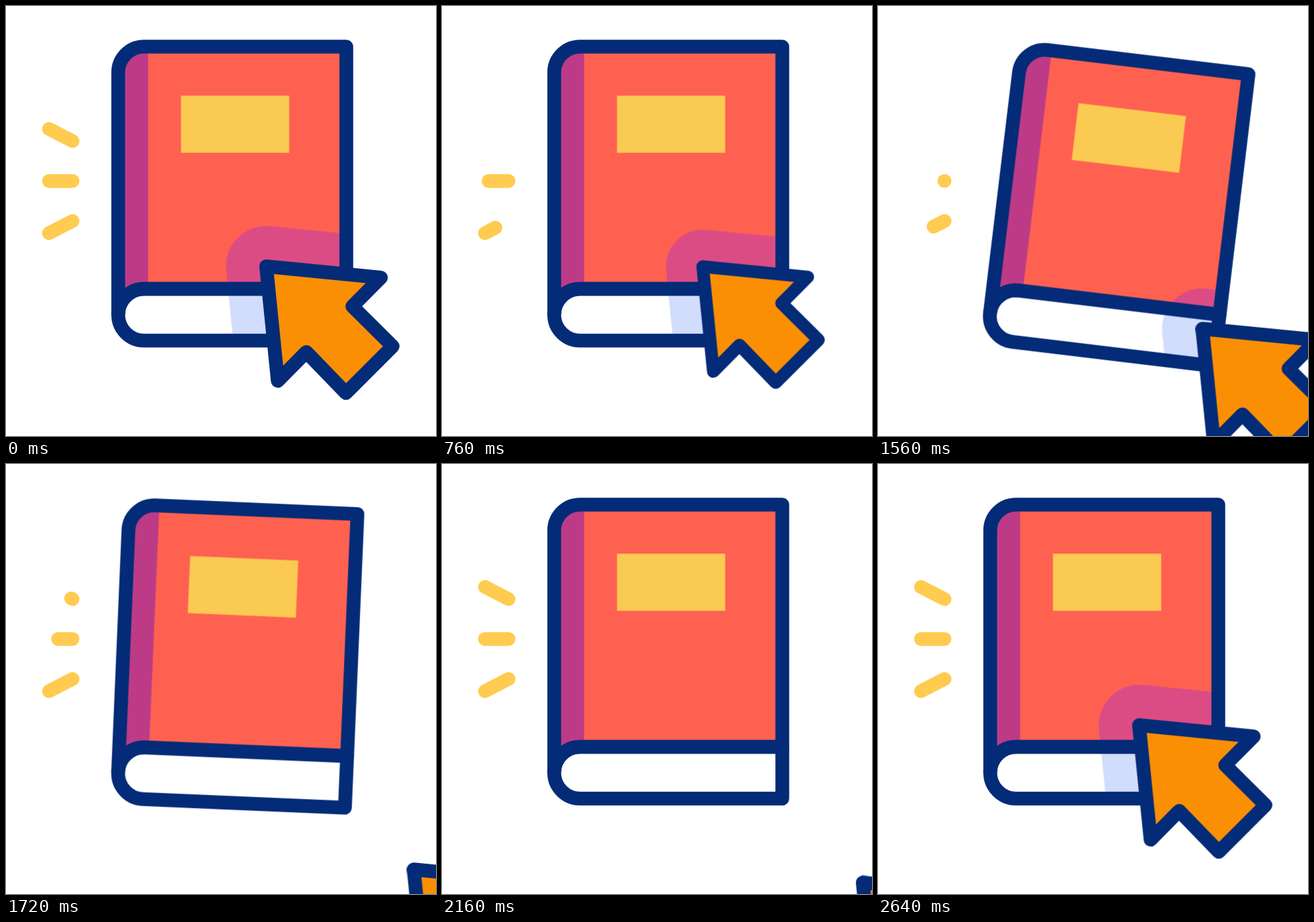
An HTML page that plays this animation: 640x640 px, repeating every 2680 ms.

```html
<!DOCTYPE html>
<html lang="en">
<head>
<meta charset="utf-8">
<title>Book and pointer</title>
<style>
  html, body { margin: 0; width: 100%; height: 100%; overflow: hidden; background: #fff; }
  svg { display: block; width: 100vw; height: 100vh; }

  .tilt, .untilt, .move, .press, .ray {
    animation: 2680ms cubic-bezier(.333, 0, .667, 1) infinite;
  }
  .tilt, .untilt { --dir: 1; transform-origin: 187px 456px; animation-name: tilt; }
  .untilt { --dir: -1; }
  .move { animation-name: move; }
  .press { transform-origin: 396px 392px; animation-name: press; }
  .ray { stroke-dasharray: 1 9; animation-name: ray; }
  .ray:nth-child(2) { animation-delay: -2550ms; }
  .ray:nth-child(3) { animation-delay: -2420ms; }

  .line { fill: none; stroke: #042b77; stroke-width: 20.5; stroke-linejoin: round; }
  .pointer { fill: #fb8f04; stroke: #042b77; stroke-width: 20.5; stroke-linejoin: round; }
  .shade { stroke-width: 120; stroke-linejoin: round; }
  .rays { fill: none; stroke: #ffcb50; stroke-width: 20.5; stroke-linecap: round; }

  @keyframes tilt {
    0%, 41.04% { transform: rotate(0deg); }
    57.21% { transform: rotate(calc(var(--dir) * 7deg)); }
    72.76% { transform: rotate(calc(var(--dir) * -3.7deg)); }
    79.85%, 100% { transform: rotate(0deg); }
  }
  @keyframes move {
    0%, 42.28% { transform: translate(0, 0); }
    49.74% { transform: translate(-16px, -17.8px); }
    70.15%, 74.63% { transform: translate(280px, 276px); }
    99.5%, 100% { transform: translate(0, 0); }
  }
  @keyframes press {
    0%, 21.14%, 42.28%, 100% { transform: scale(1); }
    10.57%, 31.71% { transform: scale(.89); }
  }
  /* 1.001 = hidden before drawing, 0 = full, -1.001 = wiped away */
  @keyframes ray {
    0% { stroke-dashoffset: 0; }
    6.23% { stroke-dashoffset: -1.001; animation-timing-function: step-end; }
    18.84% { stroke-dashoffset: 1.001; }
    25.07% { stroke-dashoffset: 0; }
    31.27% { stroke-dashoffset: -1.001; animation-timing-function: step-end; }
    52.8% { stroke-dashoffset: 1.001; }
    64.2%, 100% { stroke-dashoffset: 0; }
  }
</style>
</head>
<body>
<svg viewBox="0 0 640 640">
  <defs>
    <path id="cover" d="M506.5 421H205.5A38.5 38.5 0 0 0 167 459.5V99A38.5 38.5 0 0 1 205.5 60.5H506.5Z"/>
    <path id="pages" d="M506.5 421V498H205.5A38.5 38.5 0 0 1 205.5 421Z"/>
    <path id="arrow" d="M387.3 387.5L558 404.3L515.5 447L575.5 506.5L506 576L447 515L404.5 558Z"/>
    <clipPath id="inCover"><use href="#cover"/></clipPath>
    <clipPath id="inPages"><use href="#pages"/></clipPath>
  </defs>

  <g class="rays">
    <path class="ray" pathLength="1" d="M99 320L64 338"/>
    <path class="ray" pathLength="1" d="M99 260.5H64"/>
    <path class="ray" pathLength="1" d="M99 201L64 183"/>
  </g>

  <g class="tilt">
    <use href="#cover" fill="#ff6150"/>
    <use href="#pages" fill="#fff"/>
    <g clip-path="url(#inCover)">
      <path d="M167 60H211.5V460H167Z" fill="#bd3b86"/>
      <g class="untilt"><g class="move"><g class="press">
        <use href="#arrow" class="shade" fill="#db4c85" stroke="#db4c85"/>
      </g></g></g>
    </g>
    <g clip-path="url(#inPages)">
      <g class="untilt"><g class="move"><g class="press">
        <use href="#arrow" class="shade" fill="#d2dcfc" stroke="#d2dcfc"/>
      </g></g></g>
    </g>
    <path d="M260.5 133.5H421.5V218.5H260.5Z" fill="#fbca52"/>
    <use href="#cover" class="line"/>
    <use href="#pages" class="line"/>
  </g>

  <g class="move"><g class="press">
    <use href="#arrow" class="pointer"/>
  </g></g>
</svg>
</body>
</html>
```
